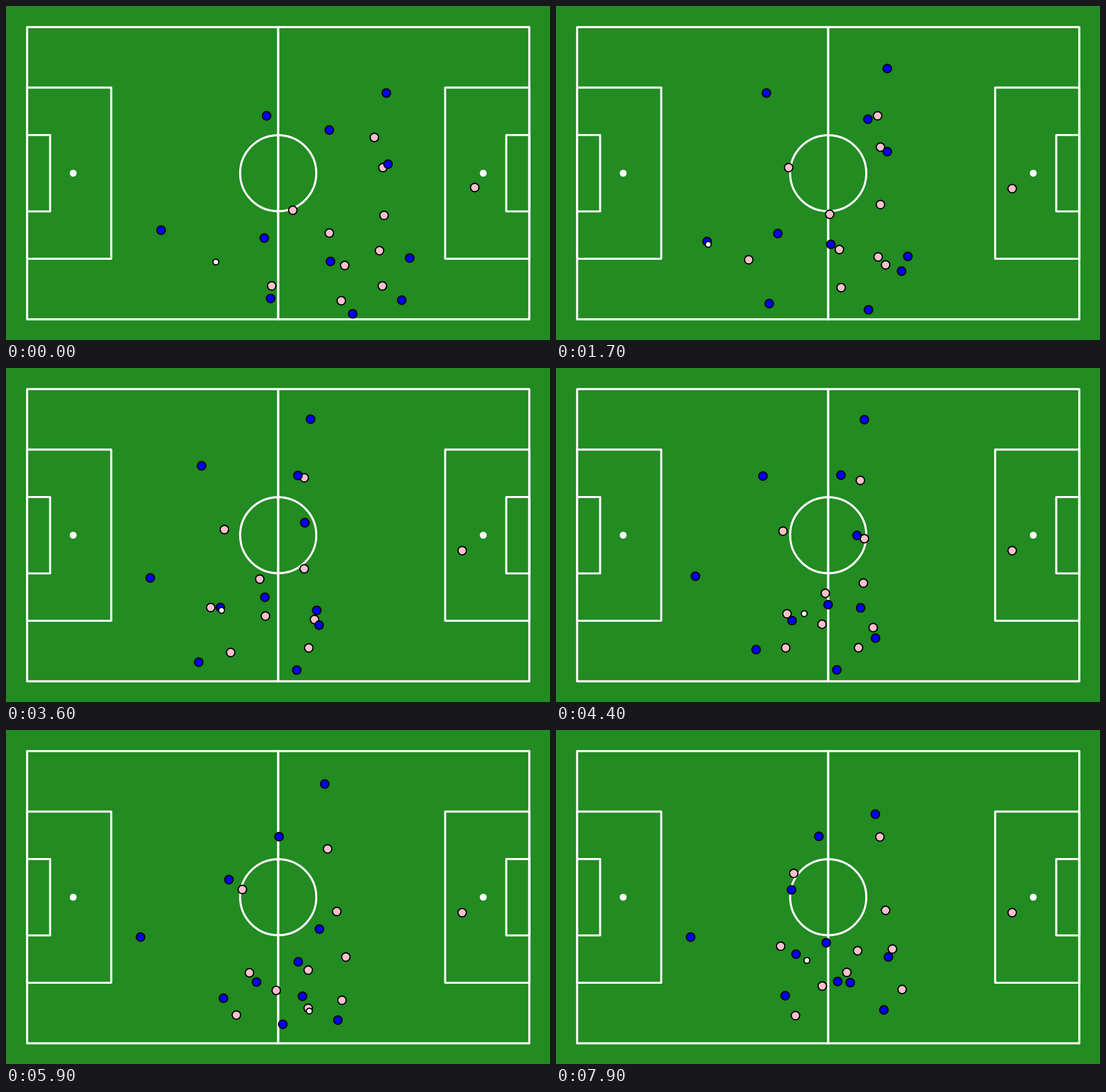
An HTML page with a canvas that plays this animation: 954 by 587 pixels, repeating every 8 s.

```html
<!DOCTYPE html>
<html lang="en">
<head>
<meta charset="utf-8">
<title>Pitch</title>
<style>
html, body { margin: 0; width: 100%; height: 100%; overflow: hidden; background: #228b22; }
canvas { display: block; }
</style>
</head>
<body>
<canvas id="pitch" width="954" height="587"></canvas>
<script>
const ctx = document.getElementById('pitch').getContext('2d');
const W = 954, H = 587, LOOP = 8, STEP = 0.1;
const BEATS = [0, 1.7, 3.6, 5.1, 5.9, 7.2, 7.9];
const _ = null; // beat a player runs through without a turn

// Smooth curve through the knots that never overshoots them
function curve(t, v) {
  const last = t.length - 1;
  const slope = i => (v[i + 1] - v[i]) / (t[i + 1] - t[i]);
  const tangent = i => {
    if (i === 0) return slope(0);
    if (i === last) return slope(last - 1);
    const a = slope(i - 1), b = slope(i);
    return a * b <= 0 ? 0 : 2 * a * b / (a + b);
  };
  return now => {
    if (now >= t[last]) return v[last];
    const i = t.findIndex((_, k) => now < t[k + 1]);
    const h = t[i + 1] - t[i], u = (now - t[i]) / h, w = 1 - u;
    return w * w * ((1 + 2 * u) * v[i] + u * h * tangent(i)) +
           u * u * ((3 - 2 * u) * v[i + 1] - w * h * tangent(i + 1));
  };
}

const movers = [];
function add(color, radius, at) {
  movers.push({ color, radius, at });
  return at;
}

// One turning point per beat; a player stands still after the last one
function run(color, ...turns) {
  const beats = BEATS.filter((_, i) => turns[i]);
  const spots = turns.filter(Boolean);
  const x = curve(beats, spots.map(p => p[0]));
  const y = curve(beats, spots.map(p => p[1]));
  return add(color, 7.4, now => [x(now), y(now)]);
}
const pink = (...turns) => run('#ffc0cb', ...turns);
const blue = (...turns) => run('#0000ff', ...turns);

pink([822, 319], [800, 321]);
pink([646, 231], [564, 193], [523, 193], _, [564, 209], _, [568, 188]);
pink([661, 284], [569, 248], [524, 272], [563, 318], [580, 319], _, [578, 317]);
pink([503, 359], [408, 284], [383, 284], [412, 289], _, [417, 252]);
pink([663, 368], [569, 349], [523, 353], [564, 398], [596, 399], _, [590, 385]);
pink([655, 430], [565, 441], [541, 442], [575, 470], _, [605, 479], [607, 456]);
pink([594, 456], [497, 428], [455, 436], [476, 460], _, [467, 450]);
pink([466, 492], [338, 446], [359, 421], [437, 441], _, [394, 380]);
pink([588, 518], [500, 495], [394, 500], [410, 485], [404, 501], _, [420, 502]);
const pinkMid = pink([567, 399], [480, 366], [445, 371], [507, 418], [530, 422], [541, 411], [529, 388]);
const pinkWing = pink([660, 492], [578, 455], [531, 492], _, [530, 489], _, [510, 426]);

const keeper = blue([272, 394], [265, 414], [253, 369], [236, 364]);
const back = blue([453, 408], [389, 400], [376, 421], [445, 458], _, [421, 394]);
blue([667, 153], [581, 110], [534, 90], _, [559, 95], _, [560, 148]);
blue([457, 193], [369, 153], [343, 172], [384, 214], [391, 263], _, [413, 281]);
blue([567, 218], [547, 199], [512, 189], _, _, [461, 187]);
blue([670, 278], [581, 256], [524, 272], [535, 321], _, [583, 399]);
blue([569, 449], [482, 419], [454, 403], [505, 437], [520, 468], _, [516, 444]);
blue([708, 443], [617, 440], [545, 426], [526, 417], _, _, [474, 374]);
blue([694, 517], [606, 466], [549, 452], [574, 500], [582, 510], _, [575, 492]);
blue([608, 541], [548, 534], [510, 531], [484, 530], _, _, [494, 442]);
blue([464, 514], [374, 523], [338, 517], [368, 476], _, [402, 467]);

// The ball stays at a carrier's feet and flies straight between spells
const feet = player => now => {
  const [x, y] = player(now);
  return [x + 2, y + 5];
};
const spot = (x, y) => () => [x, y];
const spells = [
  { at: spot(368, 450), from: 0, to: 0 },
  { at: feet(keeper), from: 0.8, to: 1.9 },
  { at: feet(back), from: 2.7, to: 4.1 },
  { at: feet(pinkMid), from: 4.9, to: 5.2 },
  { at: feet(pinkWing), from: 5.7, to: 6.2 },
  { at: spot(482, 365), from: 7.2, to: 7.2 },
  { at: spot(440, 405), from: 7.9, to: LOOP }
];

function ball(now) {
  const next = spells.findIndex(s => now <= s.to);
  const b = spells[next];
  if (now >= b.from) return b.at(now);
  const a = spells[next - 1];
  const u = (now - a.to) / (b.from - a.to);
  const p = a.at(a.to), q = b.at(b.from);
  return p.map((v, i) => v + (q[i] - v) * u);
}
add('#ffffff', 5.1, ball);

function disc(x, y, r) {
  ctx.beginPath();
  ctx.arc(x, y, r, 0, Math.PI * 2);
}

// Pitch units are decimetres: 1200 by 700 with a margin of 50
function drawPitch() {
  ctx.fillStyle = '#228b22';
  ctx.fillRect(0, 0, W, H);
  ctx.save();
  ctx.scale(W / 1300, H / 800);
  ctx.translate(50.5, 50.5);
  ctx.strokeStyle = ctx.fillStyle = '#ffffff';
  ctx.lineWidth = 5;
  ctx.lineJoin = 'round';
  ctx.strokeRect(0, 0, 600, 700);
  ctx.strokeRect(600, 0, 600, 700);
  for (const [depth, width] of [[201, 410], [55, 183]]) {
    for (const x of [0, 1200 - depth]) ctx.strokeRect(x, 350 - width / 2, depth, width);
  }
  disc(600, 350, 91);
  ctx.stroke();
  for (const x of [110, 1090]) {
    disc(x, 350, 8.3);
    ctx.fill();
  }
  ctx.restore();
}

function draw(now) {
  drawPitch();
  ctx.strokeStyle = '#000000';
  ctx.lineWidth = 2.2;
  for (const m of movers) {
    disc(...m.at(now), m.radius);
    ctx.fillStyle = m.color;
    ctx.fill();
    ctx.stroke();
  }
}

const start = performance.now();
function tick() {
  const t = (performance.now() - start) / 1000 % LOOP;
  draw(Math.floor(t / STEP) * STEP);
  requestAnimationFrame(tick);
}
tick();
</script>
</body>
</html>
```
